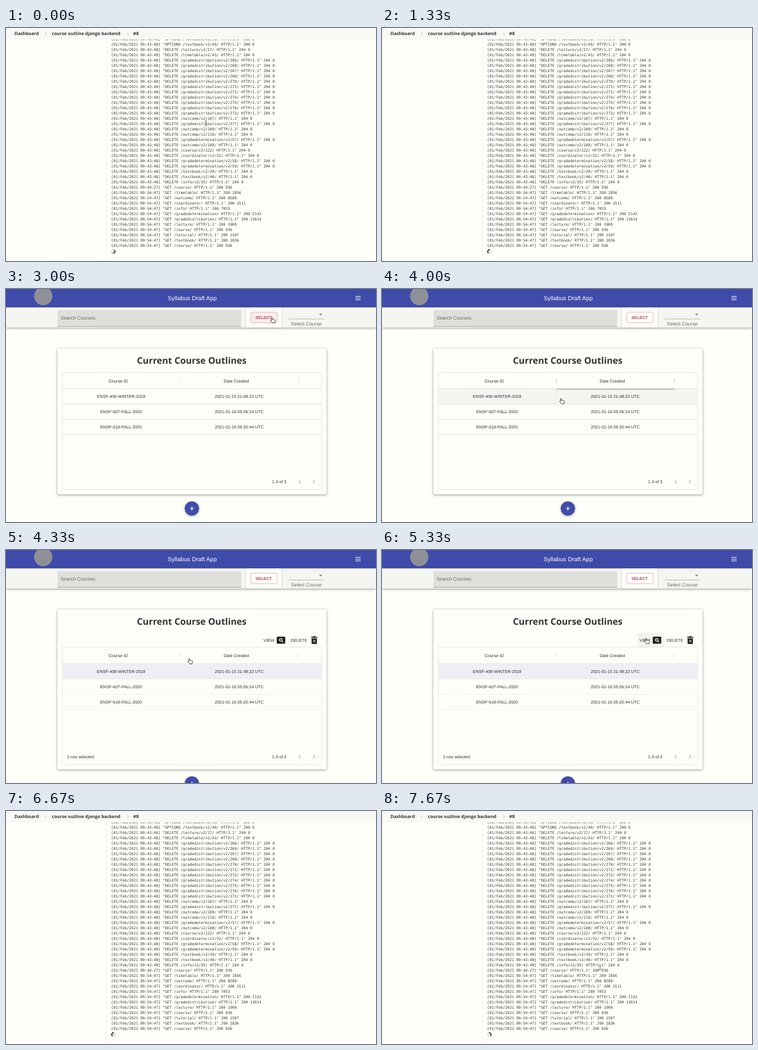
Recreate the animation shown at these times as an HTML page. Size 626 px wide and 396 px high, loop 8000 ms.

```html
<!DOCTYPE html>
<html lang="en">
<head>
<meta charset="utf-8">
<title>Syllabus Draft App</title>
<style>
html, body { margin: 0; width: 100%; height: 100%; overflow: hidden; background: #fffffa; }
svg { display: block; width: 626px; height: 396px; }
text { font-family: "Liberation Sans", Arial, sans-serif; fill: #2c2c2b; white-space: pre; text-rendering: geometricPrecision; }
.log { font: 6.3px "DejaVu Sans Mono", monospace; fill: #333; }
.head { font-family: "Open Sans", "Noto Sans", sans-serif; font-weight: 700; fill: #333; }
.label { font: 500 8.67px "Noto Sans CJK SC", "Noto Sans", sans-serif; fill: #222; }
.raised { filter: drop-shadow(0 1px 2px rgba(0, 0, 0, .42)); }
.soft { filter: drop-shadow(0 .5px 1px rgba(0, 0, 0, .28)); }
</style>
</head>
<body>
<svg id="stage" viewBox="0 0 626 396"></svg>
<script>
const stage = document.getElementById('stage');
const LOOP = 8000, TICKS = 24;
const BLUE = '#3f4ba8', PAPER = '#fffffa', LINE = '#dfdfdb';
const starts = Array.from({ length: TICKS }, (_, i) => Math.round(i * 100 / 3) * 10);

// tick: [shape, left, top]
const pointer = {
  0: ['beam', 338, 162], 1: ['beam', 338, 162], 2: ['beam', 188, 183],
  6: ['hand', 407, 195], 7: ['arrow', 392, 73], 8: ['arrow', 433, 59],
  9: ['hand', 447, 48], 10: ['hand', 446, 55.5], 11: ['hand', 340, 175],
  12: ['hand', 300, 185.5], 13: ['hand', 307, 184], 14: ['hand', 463, 155],
  15: ['hand', 444, 149.5], 16: ['hand', 444, 149.5], 18: ['arrow', 435, 91],
  22: ['arrow', 399, 5], 23: ['beam', 369, 266]
};
const shapes = {
  beam: '<path d="M-1.5-4Q0-4 0-3V3Q0 4-1.5 4M1.5-4Q0-4 0-3M0 3Q0 4 1.5 4" fill="none" stroke="#333" stroke-width=".8"/>',
  arrow: '<path d="M.5.5V9L2.6 7.1 4 10 5.4 9.4 4.1 6.6H6.8Z" fill="#222" stroke="#fff" stroke-width=".7"/>',
  hand: '<path d="M2.2 5.5V1.2Q2.2.4 2.9.4T3.7 1.2V3.7L7.6 4.3Q8.7 4.6 8.6 5.7L8 8V9.6H3.3V8.7L.6 6Q.2 5.2 1 5Z" fill="#fff" stroke="#222" stroke-width=".8"/>'
};

const rect = (x, y, w, h, fill, more = '') =>
  `<rect x="${x}" y="${y}" width="${w}" height="${h}" fill="${fill}" ${more}/>`;
const path = (d, color, width = 1) =>
  `<path d="${d}" fill="none" stroke="${color}" stroke-width="${width}"/>`;
const text = (x, y, size, str, more = '') =>
  `<text x="${x}" y="${y}" font-size="${size}" ${more}>${str}</text>`;
const mid = (x, y, size, str, more = '') => text(x, y, size, str, 'text-anchor="middle" ' + more);
const move = (x, y, body) => `<g transform="translate(${x} ${y})">${body}</g>`;

const removed = ['lecture/v2/27', 'timetable/v2/43',
  ...[266, 269, 267, 268, 270, 271, 272, 274, 275, 276, 273].map(n => 'gradedistribution/v2/' + n),
  'outcome/v2/107', 'gradedistribution/v2/277', 'outcome/v2/109', 'outcome/v2/110',
  'gradedetermination/v2/57', 'outcome/v2/108', 'course/v2/122', 'coordinator/v2/32',
  'gradedetermination/v2/58', 'gradedetermination/v2/59', 'textbook/v2/39', 'textbook/v2/40', 'info/v2/35'];
const fetched = ['course 936', 'timetable 1856', 'outcome 8589', 'coordinator 1511', 'info 7053',
  'gradedetermination 2142', 'gradedistribution 13614', 'lecture 1909', 'course 936',
  'tutorial 1507', 'textbook 2836', 'course 936'];
const entry = (time, verb, url, status) =>
  `[01/Feb/2021 ${time}] "${verb} /${url}/ HTTP/1.1" ${status}`;
const log = [
  ...[39, 40].map(n => entry('09:43:48', 'OPTIONS', 'textbook/v2/' + n, '200 0')),
  ...removed.map(url => entry('09:43:48', 'DELETE', url, '204 0')),
  ...fetched.map((item, i) => {
    const [url, size] = item.split(' ');
    return entry(i ? '09:54:47' : '09:44:27', 'GET', url, '200 ' + size);
  })
];

function spinner(tick) {
  return `<g transform="translate(181.7 379.8) rotate(${tick * 45})">`
    + '<circle r="2.9" fill="none" stroke="#aaa" stroke-width="1.3" stroke-dasharray="1.3 1"/>'
    + path('M1.4-2.5A2.9 2.9 0 0 1-.8 2.8', '#222', 1.5) + '</g>';
}

function terminal(tick) {
  const crumb = (x, str) => text(x, 12.3, 7.6, str, 'class="head"');
  const sep = x => path(`M${x} 7.7L${x + 1.7} 9.5L${x} 11.3`, '#999', .7);
  return log.map((line, i) => text(178, 21.2 + i * 9, 6.3, line, 'class="log"')).join('')
    + rect(0, 0, 626, 19.5, '#f8f8f5') + path('M170 19.5V396', '#f0f0ec')
    + crumb(14.3, 'Dashboard') + sep(67) + crumb(77.5, 'course outline django backend')
    + sep(205.5) + crumb(215.3, '#8') + spinner(tick);
}

// shift: how far the select button sits left of its resting place
function topBar(shift, course, hot) {
  const left = 478 - shift, red = shift ? '#cc3d58' : '#b5445a';
  return `<g class="raised">${rect(0, 31, 626, 34.5, '#f5f5f2')}</g>`
    + rect(0, 0, 626, 31.3, BLUE) + '<circle cx="63" cy="12" r="15.5" fill="#8f8f98"/>'
    + mid(315, 19.2, 10.1, 'Syllabus Draft App', 'style="fill:#fff"')
    + path('M591 12.5H600M591 15.5H600M591 18.5H600', '#fff', 1.1)
    + `<path d="M87 63.5V38.5Q87 36 89.5 36H${395.5 - shift}Q${398 - shift} 36 ${398 - shift} 38.5V63.5Z" fill="#dfdfdc"/>`
    + path(`M87 63.5H${398 - shift}`, '#959592', .8)
    + text(92.3, 52, 8.2, 'Search Courses', 'style="fill:#6b6b69"')
    + `<g class="soft">${rect(406 - shift, 31.5, 60.5, 34, PAPER)}</g>`
    + rect(414.2 - shift, 39.3, 44.6, 18, hot ? '#fbecee' : PAPER, 'rx="2.3" stroke="#dba0ad" stroke-width=".8"')
    + mid(436 - shift, 51, 7.05, 'SELECT', `font-weight="700" style="fill:${red}"`)
    + path(`M${left}${' '}51H538`, '#969693', .7)
    + '<path d="M529.7 42.3H535.3L532.5 45.1Z" fill="#757573"/>'
    + (course ? text(432.8, 46.3, 8.1, course) : '')
    + mid((left + 538) / 2, 62.2, 8.28, 'Select Course', 'style="fill:#6b6b69"');
}

const courses = [
  ['ENSF-409-WINTER-2018', '2021-01-15 21:48:22 UTC'],
  ['ENSF-607-FALL-2020', '2021-01-16 05:06:24 UTC'],
  ['ENSF-619-FALL-2020', '2021-01-16 05:20:44 UTC']
];

function table(tick, picked) {
  const hover = [6, 11, 12].includes(tick);
  const fill = picked ? '#eeeef5' : hover ? '#f4f4f1' : PAPER;
  const rule = picked ? '#ececE8' : LINE;
  return rect(95.3, 141.5, 438.7, 199.5, 'none', `rx="2" stroke="${LINE}" stroke-width=".8"`)
    + rect(95.7, 169.8, 438, 25.7, fill) + path('M95 169.5H534', LINE, .9)
    + mid(190, 158.5, 7.2, 'Course ID') + mid(389.6, 158.5, 7.2, 'Date Created')
    + path('M295 152.8V159M494.8 152.8V159', tick === 12 ? '#b5b5b2' : '#d6d6d2', 1)
    + courses.map(([id, date], i) => {
      const y = 185 + i * 26;
      return mid(194.8, y, 7.13, id) + mid(394.6, y, 7.13, date)
        + path(`M95 ${y + 10.5}H534`, rule, .9);
    }).join('')
    + (tick === 12 ? path('M295 170.2H495', '#85858a', .9) + path('M295 170V195', '#e4e4e0', .7) : '')
    + (picked ? text(103, 330.2, 7.15, '1 row selected') : '')
    + text(450, 330.2, 7.15, '1-3 of 3')
    + path('M498.3 324.6L495.4 327.5L498.3 330.4M519.4 324.6L522.3 327.5L519.4 330.4', '#b3b3b0', 1.1);
}

function actions(hot) {
  return (hot ? rect(432, 141, 46, 24, '#f2f2ef', 'rx="1.5"') : '')
    + text(435.6, 156.2, 7.1, 'VIEW') + rect(458, 147.3, 14.5, 12, '#222', 'rx="1.5"')
    + '<circle cx="464.8" cy="152.8" r="2.2" fill="none" stroke="#fff" stroke-width="1.1"/>'
    + path('M466.5 154.5L468.7 156.8', '#fff', 1.2)
    + text(481.8, 156.2, 7.2, 'DELETE')
    + '<path d="M516.3 147.6H519L520 146.6H523L524 147.6H526.8V149.2H516.3ZM517 150.2H526V158.4Q526 159.8 524.6 159.8H518.4Q517 159.8 517 158.4Z" fill="#222"/>'
    + path('M519.7 152.8L523.3 156.8M523.3 152.8L519.7 156.8', '#fff', 1);
}

function home(tick) {
  const picked = tick >= 13;
  const drop = picked ? 23.7 : 0;
  const fab = `<circle class="raised" cx="314.5" cy="373" r="12" fill="${BLUE}"/>`
    + path('M311 373H318M314.5 369.5V376.5', '#fff', 1.2);
  return `<g class="raised">${rect(87, 101, 455.3, 248 + drop, PAPER, 'rx="1.5"')}</g>`
    + mid(314.3, 127.3, 15.35, 'Current Course Outlines', 'class="head"')
    + (picked ? actions(tick >= 15) : '')
    + move(0, drop, table(tick, picked) + fab)
    + topBar(0, '', tick === 9 || tick === 10);
}

function detail() {
  const label = (y, str) => text(102.3, y, 8.67, str, 'class="label"');
  const value = (y, str, x = 102.3, more = '') => text(x, y, 10.13, str, more);
  const about = [
    'A survey of software design and development topics for Engineering students. Topics include:',
    'key features of an object-oriented programming language, especially inheritance and',
    'polymorphism; elements of object-oriented design; programming and application of common',
    'data structures; strategies and tools for testing and debugging.'
  ];
  return path('M104 90.8H96.5M100 87.2L96.4 90.8L100 94.4', '#333', 1.1)
    + text(480.8, 95.1, 7.2, 'GENERATE PDF')
    + `<g class="raised">${rect(87, 103, 455.3, 310, PAPER, 'rx="1.5"')}</g>`
    + text(94.6, 131, 16.1, '1. Calendar Information', 'font-weight="700" style="fill:#333"')
    + path('M525.8 126.7L528.5 124L531.2 126.7', '#666', 1.1)
    + `<g class="soft">${rect(95, 151.3, 439, 260, PAPER, 'rx="1.5"')}</g>`
    + label(168.5, 'Course Number:') + value(183.2, 'ENSF 409', 108)
    + label(196.4, 'Course Name:') + value(211, 'Principles of Software Development', 108)
    + label(236.4, 'Course Description:') + about.map((line, i) => value(251 + i * 16, line)).join('')
    + label(324.4, 'Course Hours:') + value(339, '3 units; H (3-2)')
    + label(352.4, 'Academic Credit:') + value(367, '3')
    + label(380.4, 'Calendar Reference:')
    + value(395, 'http://www.ucalgary.ca/pubs/calendar/current/software-engineering-for-engineers.html#38252',
      102.3, 'style="fill:#3b74b0"')
    + topBar(46, 'ENSF-409-WINTER-2018', false);
}

function draw(tick) {
  const scene = tick < 5 || tick >= 20 ? terminal : tick < 17 ? home : detail;
  const [shape, x, y] = pointer[tick] || [];
  stage.innerHTML = rect(0, 0, 626, 396, PAPER) + scene(tick) + (shape ? move(x, y, shapes[shape]) : '');
}

let shown = -1;
const begin = performance.now();
function frame() {
  const time = (performance.now() - begin) % LOOP;
  const tick = starts.filter(s => s <= time).length - 1;
  if (tick !== shown) draw(shown = tick);
  requestAnimationFrame(frame);
}
frame();
</script>
</body>
</html>
```
